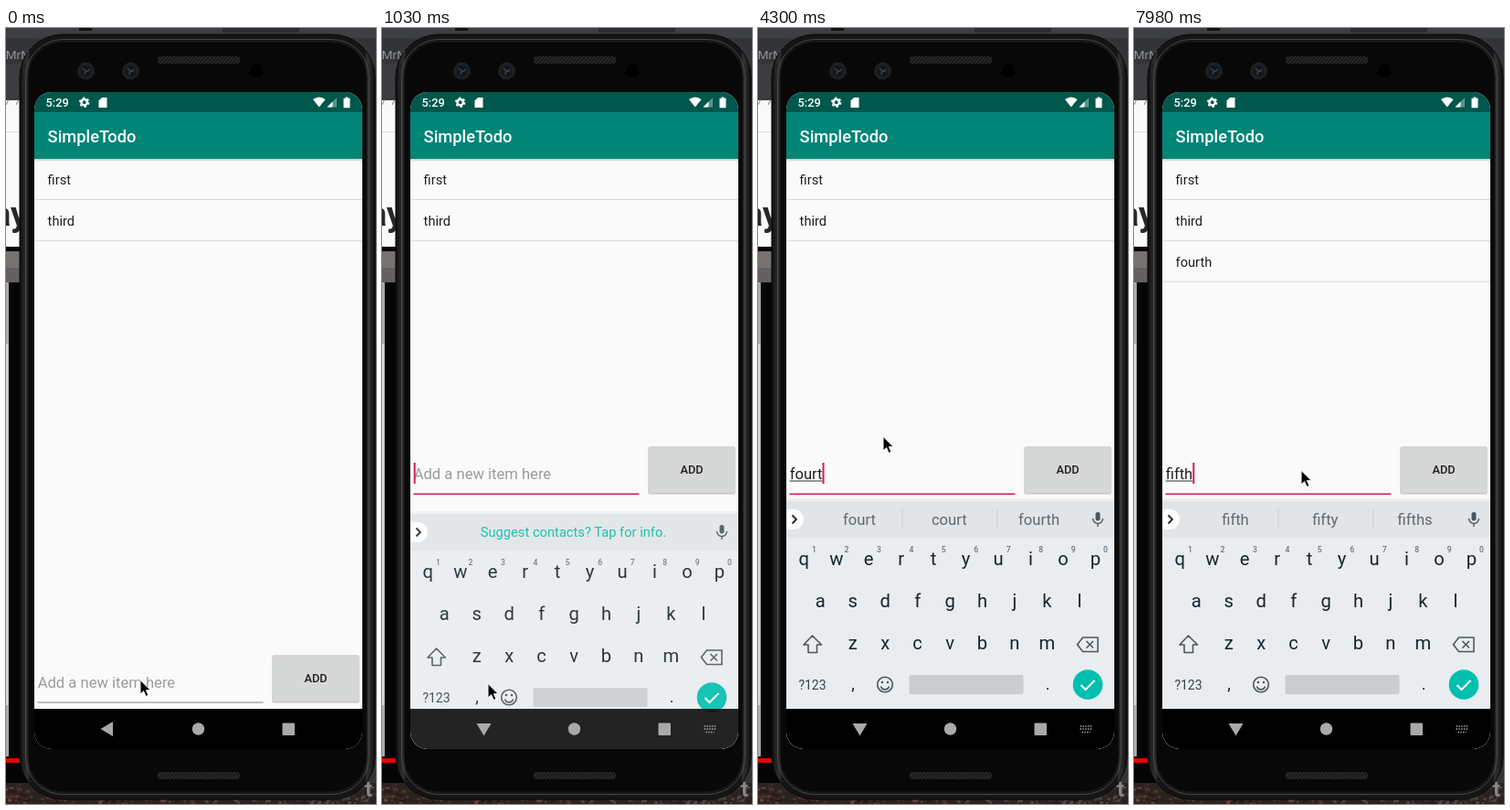
Recreate the animation shown at these times as an HTML page. Size 405x848 px, loop 8000 ms.

```html
<!DOCTYPE html>
<html lang="en">
<head>
<meta charset="utf-8">
<title>SimpleTodo</title>
<style>
  html, body { margin: 0; width: 100%; height: 100%; overflow: hidden; background: #333437; }
  svg { display: block; width: 405px; height: 848px; font-family: Roboto, sans-serif; }
  .mid { text-anchor: middle; }
  .med { font-weight: 500; }
  .row { font-size: 14.63px; fill: #202020; }
  .key { font-size: 20.2px; fill: #15252d; text-anchor: middle; }
  .tiny { font-size: 8.6px; font-weight: 500; fill: #68737a; text-anchor: middle; }
  .line { fill: none; stroke: #4a575e; stroke-width: 1.6; }
  .field { font-size: 16.6px; }
</style>
</head>
<body>
<svg viewBox="0 0 405 848">
  <defs>
    <linearGradient id="rim" x1="0" x2="1" y1="0" y2="0">
      <stop offset="0" stop-color="#0c0c0c"/><stop offset=".012" stop-color="#242424"/>
      <stop offset=".022" stop-color="#303030"/><stop offset=".03" stop-color="#151515"/>
      <stop offset=".97" stop-color="#151515"/><stop offset=".978" stop-color="#303030"/>
      <stop offset=".988" stop-color="#242424"/><stop offset="1" stop-color="#0c0c0c"/>
    </linearGradient>
    <linearGradient id="drop" x1="0" x2="0" y1="0" y2="1">
      <stop offset="0" stop-opacity=".2"/><stop offset="1" stop-opacity="0"/>
    </linearGradient>
    <linearGradient id="fade" x1="0" x2="0" y1="0" y2="1">
      <stop offset="0" stop-color="#fff" stop-opacity=".5"/>
      <stop offset=".76" stop-color="#fff" stop-opacity=".52"/>
      <stop offset=".85" stop-color="#fff"/>
    </linearGradient>
    <pattern id="mesh" width="4" height="4" patternUnits="userSpaceOnUse">
      <rect width="4" height="4" fill="#1a1a1a"/><path d="M0 4L4 0" stroke="#343434"/>
    </pattern>
    <clipPath id="glass"><rect x="31" y="70" width="359" height="718" rx="19"/></clipPath>
    <mask id="veil" maskUnits="userSpaceOnUse" x="31" y="516" width="359" height="272">
      <rect x="31" y="516" width="359" height="272" fill="url(#fade)"/>
    </mask>
  </defs>

  <!-- desktop behind the phone -->
  <rect width="405" height="848" fill="#333437"/>
  <rect width="405" height="11" fill="#3e3f42"/>
  <rect x="80" width="14" height="3" fill="#111"/><rect x="237" width="84" height="5" fill="#2b2c2f"/>
  <rect y="39" width="30" height="41" fill="#3b3c3f"/>
  <text x="-9" y="34" font-size="13.5" fill="#95979a">CMrN</text>
  <rect y="79" width="30" height="160" fill="#f9f9f9"/>
  <path d="M0 84L3 78M11 84L14 78" stroke="#777"/>
  <rect y="113" width="30" height="1" fill="#ddd"/>
  <text x="-14.500" y="216" font-size="37" font-weight="700" fill="#272727">ay</text>
  <rect y="239" width="30" height="586" fill="#050505"/>
  <rect y="244" width="30" height="34" fill="#77716f"/><rect y="262" width="30" height="16" fill="#64605f"/>
  <rect y="278" width="3" height="518" fill="#a9aaaa"/><rect y="345" width="2.5" height="395" fill="#d5d6d6"/>
  <rect y="798" width="30" height="5" fill="#f00000"/>
  <rect y="825" width="405" height="23" fill="#2b2321"/>
  <g id="specks"></g>
  <text x="393" y="840" font-size="24" font-weight="700" fill="#858587">t</text>

  <!-- phone -->
  <rect x="15" y="7" width="389" height="836" rx="47" fill="url(#rim)" stroke="#090909"/>
  <rect x="21.5" y="12.5" width="376" height="825" rx="41" fill="none" stroke="#474747"/>
  <rect x="24" y="15" width="371" height="820" rx="39" fill="#080808" stroke="#1a1a1a"/>
  <rect x="166" y="31" width="90" height="8" rx="3" fill="url(#mesh)"/>
  <rect x="166" y="813" width="90" height="8" rx="3" fill="url(#mesh)"/>
  <g id="lenses"></g>
  <circle cx="274" cy="47" r="7" fill="#000"/>

  <g clip-path="url(#glass)">
    <rect x="31" y="70" width="359" height="718" fill="#fafafa"/>
    <g id="list"></g>
    <rect x="31" y="92" width="359" height="51" fill="#008577"/>
    <rect x="31" y="143" width="359" height="3" fill="url(#drop)"/>
    <rect x="31" y="70" width="359" height="22" fill="#00574b"/>
    <text x="45.6" y="125" class="med" font-size="18.3" fill="#fff">SimpleTodo</text>
    <g fill="#fff">
      <text x="43.6" y="86" class="med" font-size="12.8">5:29</text>
      <circle cx="85.7" cy="81.2" r="3.2" fill="none" stroke="#fff" stroke-width="2.4"/>
      <circle cx="85.7" cy="81.2" r="4.9" fill="none" stroke="#fff" stroke-width="1.6" stroke-dasharray="2.5 2.63"/>
      <path d="M105 76h5.5v11h-9v-7.500z"/>
      <path d="M336 78q6.800-5 13.600 0L342.800 86.500z"/>
      <path d="M362 76v10.500h-10.500z" opacity=".35"/><path d="M357.500 80.500v6h-6z"/>
      <path d="M371.500 75.500h3v1.200h2v10.500h-7v-10.500h2z"/>
    </g>

    <g id="form">
      <rect x="34.500" y="508.500" width="247" height="1" id="rule"/>
      <text x="34.700" y="493" class="field" id="entry"></text>
      <rect x="34.700" y="494.500" height="1" fill="#333" id="under"/>
      <rect y="475" width="2" height="23" fill="#d81b60" id="caret"/>
      <rect x="291" y="458" width="96" height="52" rx="2" fill="#000" opacity=".1"/>
      <rect x="291.500" y="457.500" width="95" height="51.500" rx="2" fill="#000" opacity=".13"/>
      <rect x="291.500" y="457" width="95" height="51" rx="2" id="button"/>
      <text x="339" y="487" class="mid med" font-size="12.800" fill="#202020">ADD</text>
    </g>

    <g id="veiled">
      <g id="board">
        <rect x="31" y="514" width="359" height="3" fill="#000" opacity=".04"/>
        <rect x="31" y="517" width="359" height="271" fill="#e9edf0"/>
        <rect x="31" y="517" width="359" height="40" fill="#e1e5e8"/>
        <path d="M31 526h8a11 11 0 0 1 0 22h-8z" fill="#fff"/>
        <path d="M37.500 532.500l4.500 4.500-4.500 4.500" class="line" style="stroke:#222;stroke-width:1.800"/>
        <g id="strip"></g>
        <rect x="369.500" y="529" width="5" height="9.500" rx="2.500" fill="#4a575e"/>
        <path d="M366.500 536a5.500 5.500 0 0 0 11 0M372 541.500v3.500" class="line" style="stroke-width:1.400"/>
        <g id="keys"></g>
        <path d="M59.500 664l-9.500 10h5v8.500h9.500V674h5z" class="line" stroke-linejoin="round"/>
        <path d="M355.500 666H372v15.500h-16.500l-6-7.800zM359.500 670l7.500 7.500m0-7.500l-7.500 7.500" class="line"/>
        <text x="59.500" y="723" class="mid" font-size="14" fill="#34444c">?123</text>
        <text x="104" y="723" class="key" style="font-size:18px">,</text>
        <text x="317" y="723" class="key" style="font-size:18px">.</text>
        <circle cx="139" cy="717.500" r="8.300" class="line"/>
        <path d="M134.500 719.500a4.700 4.700 0 0 0 9 0" class="line"/>
        <circle cx="136" cy="715" r="1.300" fill="#4a575e"/><circle cx="142" cy="715" r="1.300" fill="#4a575e"/>
        <rect x="165.500" y="707" width="125" height="21" rx="2" fill="#c9cdd0"/>
        <circle cx="361" cy="717.500" r="16.300" fill="#00bfae"/>
        <path d="M353.500 718l5 5 10-10" fill="none" stroke="#fff" stroke-width="2"/>
      </g>
    </g>

    <rect x="31" y="744" width="359" height="44" id="nav"/>
    <g fill="#a9a9a9">
      <path id="back"/>
      <circle cx="210.500" cy="766" r="6.700"/>
      <rect x="302.500" y="759.500" width="13.500" height="13.500" rx="1"/>
      <path id="switcher" d="M352.500 763h13m-13 3h13m-11 3.500h9" stroke="#a9a9a9" stroke-width="1.600" stroke-dasharray="1.500 1.300"/>
    </g>

    <g id="toast">
      <rect x="138" y="681.500" width="145" height="41" rx="20.500" fill="#000" opacity=".05"/>
      <rect x="138.500" y="681" width="144" height="40" rx="20" fill="#ececec"/>
      <text x="210.300" y="705" class="mid" font-size="12.600" fill="#222">Item added to list</text>
    </g>
  </g>
  <path id="pointer" d="M0 0V15.500L3.600 12.200 6.200 18 9 16.800 6.400 11.200H11.300z" fill="#000" stroke="#fff" stroke-width="1" stroke-linejoin="round"/>
</svg>

<script>
const LOOP = 8000;
const $ = id => document.getElementById(id);
const label = (x, y, cls, str, more = '') => `<text x="${x}" y="${y}" class="${cls}" ${more}>${str}</text>`;
const show = (id, on) => $(id).setAttribute('visibility', on ? 'visible' : 'hidden');
const set = (id, attrs) => { for (const k in attrs) $(id).setAttribute(k, attrs[k]); };

// Mottled wallpaper along the bottom: reddish on the left, grey on the right.
let seed = 7;
const rand = () => (seed = seed * 16807 % 2147483647) / 2147483647;
$('specks').innerHTML = Array.from({ length: 500 }, () => {
  const x = rand() * 405, light = 8 + rand() * 26;
  return `<rect x="${x}" y="${825 + rand() * 22}" width="${1 + rand() * 4}" height="${1 + rand() * 2}"
    fill="hsl(14 ${x < 205 ? 30 : 6}% ${light}%)"/>`;
}).join('');

$('lenses').innerHTML = [87.5, 136.5].map(x =>
  `<circle cx="${x}" cy="47" r="9.5" fill="#1c2023"/><circle cx="${x}" cy="47" r="6" fill="#11161b"/>
   <path d="M${x - 4} 44l4 3-2 4M${x + 1} 48l3-3" stroke="#3b4650" fill="none" stroke-width="1.5"/>`).join('');

const keyRow = (chars, x, y) => [...chars].map((c, i) => label(x + i * 35.45, y, 'key', c)).join('');
$('keys').innerHTML = keyRow('qwertyuiop', 50.3, 587) + keyRow('asdfghjkl', 68.3, 633) + keyRow('zxcvbnm', 103.7, 679)
  + [...'1234567890'].map((c, i) => label(61.5 + i * 35.45, 572.5, 'tiny', c)).join('');

// Each step: start time and what changes; everything else carries over.
const steps = [
  [0, { at: [147, 713], slide: -1, focus: false, caret: false, text: '', words: '', press: 0, items: 2, toast: 0, raised: false }],
  [140, { at: [155, 720] }],
  [290, { at: [128, 720] }],
  [440, { at: [116, 717] }],
  [730, { focus: true, caret: true }],
  [880, { raised: true, slide: 69.5 }],
  [1030, { slide: 14 }],
  [1180, { slide: 0, at: [117, 690] }],
  [1330, { at: [123, 610], caret: false }],
  [1470, { at: [132, 515] }],
  [1620, { at: [136, 462] }],
  [1770, { at: [137, 447], caret: true }],
  [2370, { caret: false }],
  [2820, { caret: true }],
  [2970, { text: 'f' }],
  [3260, { text: 'fo', words: 'fo to for' }],
  [3410, { text: 'four', words: 'four your for' }],
  [3850, { caret: false }],
  [4300, { text: 'fourt', words: 'fourt court fourth', caret: true }],
  [4440, { text: 'fourth', words: 'fourth Fourth fourths' }],
  [4890, { caret: false, at: [165, 454] }],
  [5020, { at: [238, 470] }],
  [5170, { at: [312, 483] }],
  [5320, { at: [338, 485], press: .6, caret: true }],
  [5470, { press: 1, text: '', items: 3 }],
  [5620, { press: .5, words: '', toast: .4 }],
  [5760, { press: .15, toast: .85 }],
  [5900, { press: 0, toast: 1 }],
  [6050, { at: [330, 490], caret: false }],
  [6200, { at: [285, 496] }],
  [6350, { at: [213, 490] }],
  [6500, { at: [183, 484], caret: true }],
  [6950, { caret: false }],
  [7240, { text: 'f', caret: true }],
  [7390, { text: 'fif', words: 'fif fit fife' }],
  [7680, { text: 'fift', words: 'fift gift fifth', toast: .7 }],
  [7830, { text: 'fifth', words: 'fifth fifty fifths', toast: .2 }],
  [7980, { toast: 0 }],
];
let carry = {};
const states = steps.map(([t, change]) => [t, carry = { ...carry, ...change }]);

function draw(s) {
  $('list').innerHTML = ['first', 'third', 'fourth'].slice(0, s.items).map((name, i) => {
    const y = 143 + i * 44.8;
    return label(45.6, y + 28, 'row', name) + `<rect x="31" y="${y + 44}" width="359" height="1" fill="#d6d6d6"/>`;
  }).join('');

  set('form', { transform: `translate(0 ${s.raised ? 0 : 228})` });
  set('rule', { fill: s.focus ? '#d81b60' : '#858585', height: s.focus ? 1.6 : 1 });
  const entry = $('entry');
  entry.textContent = s.text || 'Add a new item here';
  set('entry', { fill: s.text ? '#212121' : '#9b9b9b' });
  const width = s.text ? entry.getComputedTextLength() : 0;
  set('under', { width });
  set('caret', { x: 34.7 + width });
  show('caret', s.caret);
  const shade = c => Math.round(c - 27 * s.press);
  set('button', { fill: `rgb(${shade(214)},${shade(215)},${shade(215)})` });

  const open = s.slide >= 0, moving = s.slide > 0;
  show('veiled', open);
  set('board', { transform: `translate(0 ${Math.max(0, s.slide)})` });
  if (s.slide > 30) set('veiled', { mask: 'url(#veil)' });
  else $('veiled').removeAttribute('mask');
  set('veiled', { opacity: moving && s.slide < 30 ? .9 : 1 });
  $('strip').innerHTML = s.words
    ? s.words.split(' ').map((w, i) => label(111 + i * 98.3, 543, 'field mid', w, 'fill="#5d6970"')).join('')
      + [157.5, 261.5].map(x => `<rect x="${x}" y="526" width="1" height="22" fill="#ccd1d4"/>`).join('')
    : label(209.5, 542, 'mid', 'Suggest contacts? Tap for info.', 'font-size="14.7" fill="#00bfa5"');

  set('nav', { opacity: moving ? (s.slide > 30 ? .52 : .85) : 1 });
  set('back', { d: open ? 'M103.5 760H119.500L111.500 773.500z' : 'M117 758V774L103.500 766z' });
  show('switcher', open);
  set('toast', { opacity: s.toast });
  set('pointer', { transform: `translate(${s.at[0]} ${s.at[1] - .5})` });
}

let last;
const start = performance.now();
function tick() {
  const t = (performance.now() - start) % LOOP;
  const state = states.findLast(([at]) => at <= t)[1];
  if (state !== last) draw(last = state);
  requestAnimationFrame(tick);
}
tick();
</script>
</body>
</html>
```
